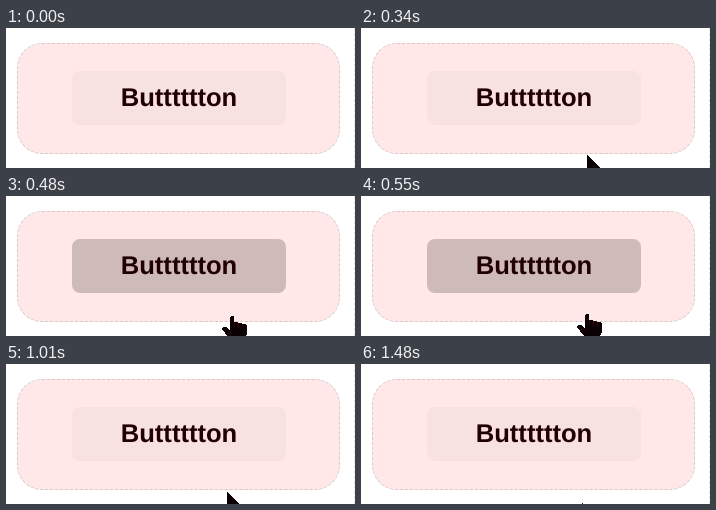
An HTML page for the animation above (1.55 s loop, 349 by 140 pixels).

```html
<!DOCTYPE html>
<html lang="en">
<head>
<meta charset="utf-8">
<title>Button hover</title>
<style>
  html, body { margin: 0; width: 100%; height: 100%; overflow: hidden; background: #fff; }
  .stage { position: relative; width: 349px; height: 140px; overflow: hidden; }
  .stage > * { position: absolute; box-sizing: border-box; }
  .card {
    left: 11px; top: 15px; width: 323px; height: 111px;
    border: 1px dashed #d3caca; border-radius: 25px; background: #ffe8e7;
  }
  .divider { left: 348px; top: 0; height: 140px; border-left: 1px dashed #e4e4e4; }
  .button {
    left: 66px; top: 43px; width: 214px; height: 54px;
    border-radius: 8px; background: #f7e2e1; color: #210004;
    font: bold 25.6px/54px "Liberation Sans", Arial, sans-serif;
    text-align: center; white-space: nowrap; text-rendering: geometricPrecision;
  }
  .button.hover { background: #cfbaba; }
</style>
</head>
<body>
<div class="stage">
  <div class="card"></div>
  <div class="divider"></div>
  <div class="button" id="button">Butttttton</div>
  <svg width="349" height="140" shape-rendering="crispEdges">
    <path id="arrow" fill="#0c0204" d="M0 0h.6l15 15v1H9l4 8-3 1-4-8-6 5z"/>
    <g id="hand">
      <path fill="#0b0003" d="M-2 1l1-1h2l1 1v5h3l1 1h3l1 1h3l2 2v8l-2 4v3H-3v-3l-4-5-3-3v-2l2-1h2l4 3V1z"/>
      <path fill="none" stroke="#35000d" d="M2.500 6v5M6.500 7v5M10.500 8v4M-1.500 14v3"/>
    </g>
  </svg>
</div>
<script>
  const LOOP = 1550, TICK = 70;
  // Straight pointer strokes, sampled once per tick, then held
  const strokes = [
    { at: 0, ticks: 1, from: [226, 150], to: [226, 150] },
    { at: 130, ticks: 3, from: [226, 138], to: [226, 127] },
    { at: 410, ticks: 2, from: [226, 121], to: [226, 118] },
    { at: 950, ticks: 1, from: [226, 120], to: [226, 120] },
    { at: 1010, ticks: 3, from: [221, 128], to: [219, 134] },
    { at: 1410, ticks: 1, from: [220, 137], to: [221, 139] }
  ];
  const [button, arrow, hand] = ["button", "arrow", "hand"].map(id => document.getElementById(id));

  function pointer(t) {
    const { at, ticks, from, to } = strokes.findLast(s => s.at <= t);
    const u = Math.min(Math.floor((t - at) / TICK) / ticks, 1);
    return from.map((v, i) => Math.round(v + (to[i] - v) * u));
  }

  function draw(now) {
    const [x, y] = pointer(now % LOOP);
    const hover = y < 125;
    button.classList.toggle("hover", hover);
    for (const [el, shown] of [[arrow, !hover], [hand, hover]]) {
      el.style.display = shown ? "" : "none";
      el.setAttribute("transform", `translate(${x} ${y})`);
    }
    requestAnimationFrame(draw);
  }
  draw(performance.now());
</script>
</body>
</html>
```
